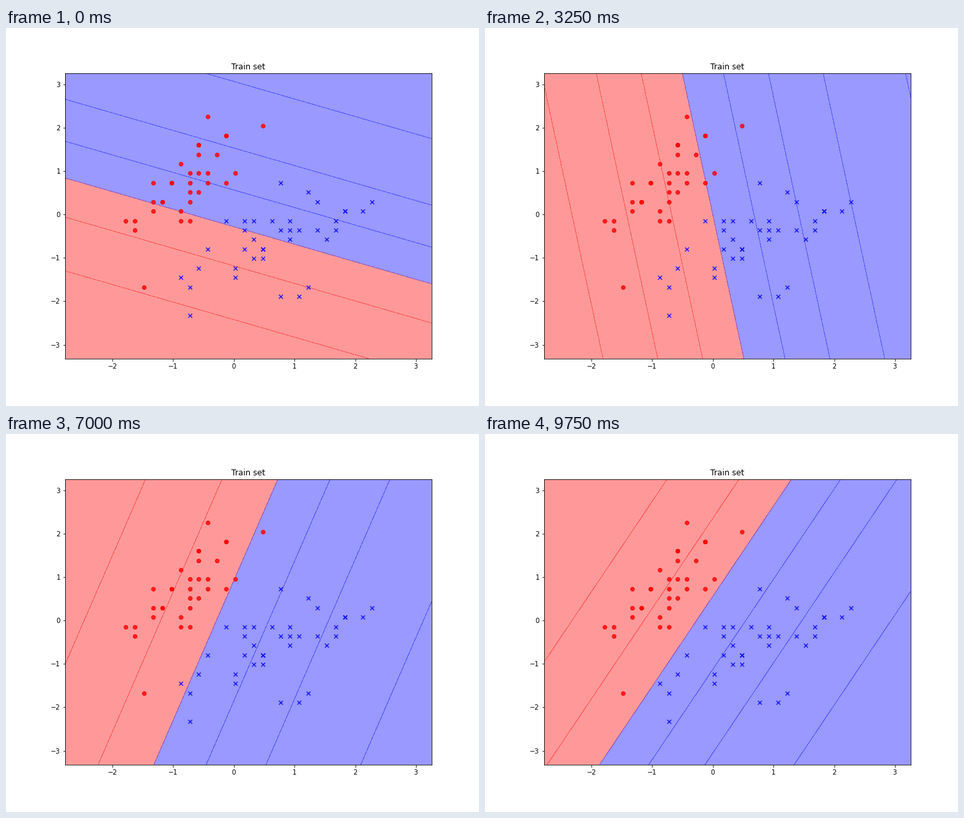
Write a matplotlib script that moves like this. It is 720 px wide and 576 px high and loops after 10 s.

```python
import matplotlib.pyplot as plt
import numpy as np
from matplotlib.animation import FuncAnimation

FRAMES, INTERVAL = 40, 250
X0, DX = -1.779, 0.1503
Y0, DY = -2.325, 0.2183

# Measurements lie on a lattice: row -> columns
RED_ROWS = {
    21: [9], 20: [15], 19: [11, 11], 18: [8, 8], 17: [8, 10], 16: [6],
    15: [7, 8, 9, 12], 14: [3, 5, 5, 7, 9, 11], 13: [7, 8],
    12: [3, 4, 4, 7], 11: [3, 6], 10: [0, 1, 6, 7], 9: [1], 3: [2],
}
BLUE_ROWS = {
    14: [17], 13: [20], 12: [21, 27], 11: [24, 24, 26],
    10: [11, 13, 14, 16, 18, 23], 9: [13, 17, 18, 19, 21, 23],
    8: [14, 18, 22], 7: [9, 13, 15, 15], 6: [14, 15], 5: [8, 12],
    4: [6, 12], 3: [7, 20], 2: [17, 19], 0: [7],
}

# Weights of the classifier at a few epochs; learning slows logarithmically
EPOCHS = np.array([0, 5, 9, 18, 24, 32, 39])
W1 = [0.2895, 0.4647, 0.5450, 0.6426, 0.6840, 0.7210, 0.7480]
W2 = [0.7160, 0.3975, 0.2232, -0.0349, -0.1538, -0.2752, -0.3593]


def log_time(epoch):
    return np.log1p(epoch / 7)


FIT1 = np.polyfit(log_time(EPOCHS), W1, 4)
FIT2 = np.polyfit(log_time(EPOCHS), W2, 4)

xs = X0 - 1 + 0.02 * np.arange(303)
ys = Y0 - 1 + 0.02 * np.arange(330)
grid_x, grid_y = np.meshgrid(xs, ys)

plt.rcParams["font.family"] = "DejaVu Sans"
fig = plt.figure(figsize=(10, 8), dpi=72, facecolor="white")
ax = fig.add_axes([0.125, 0.125, 0.775, 0.755])
ax.set_title("Train set")
ax.set_xlim(xs[0], xs[-1])
ax.set_ylim(ys[0], ys[-1])
ax.set_xticks(range(-2, 4))
ax.set_yticks(range(-3, 4))


def scatter_rows(rows, color, marker):
    pts = np.array([(c, r) for r, cols in rows.items() for c in cols])
    ax.scatter(X0 + DX * pts[:, 0], Y0 + DY * pts[:, 1],
               color=color, marker=marker, alpha=0.8, zorder=2)


scatter_rows(RED_ROWS, "red", "o")
scatter_rows(BLUE_ROWS, "blue", "x")

regions = None


def draw(epoch):
    global regions
    if regions is not None:
        regions.remove()
    u = log_time(epoch)
    logit = np.polyval(FIT1, u) * grid_x + np.polyval(FIT2, u) * grid_y
    prob = 1 / (1 + np.exp(-logit))
    # A narrow probability range gets finer bands
    step = 0.1 if np.ptp(prob) < 0.8 else 0.15
    levels = np.arange(0, 1 + step / 2, step)
    if levels[-1] < 1 - 1e-9:
        levels = np.append(levels, levels[-1] + step)
    mids = (levels[:-1] + levels[1:]) / 2
    colors = ["red" if m < 0.5 else "blue" for m in mids]
    regions = ax.contourf(grid_x, grid_y, prob, levels=levels,
                          colors=colors, alpha=0.4, zorder=1)
    return [regions]


anim = FuncAnimation(fig, draw, frames=FRAMES, init_func=lambda: draw(0),
                     interval=INTERVAL, repeat=True, repeat_delay=0)
plt.show()
```
